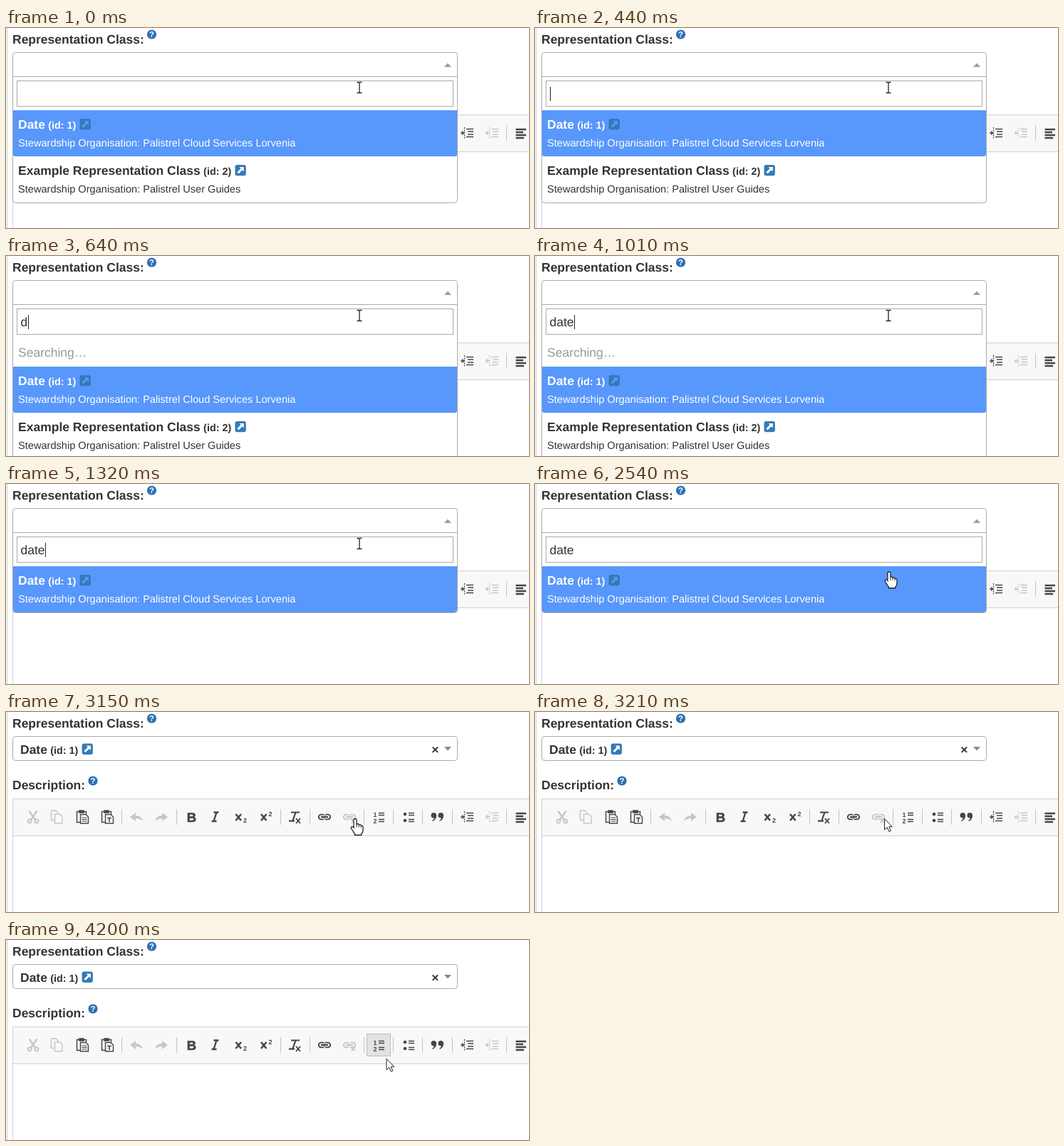
An HTML page for the animation above (4270 ms loop, 734 by 282 pixels).

```html
<!DOCTYPE html>
<html lang="en">
<head>
<meta charset="utf-8">
<title>Representation class picker</title>
<style>
  html, body { margin: 0; width: 100%; height: 100%; overflow: hidden; background: #fff; }
  svg { display: block; width: 734px; height: 282px; }
  text { font: 17.5px "Liberation Sans", Arial, sans-serif; fill: #333; text-rendering: geometricPrecision; white-space: pre; }
  .bold { font-weight: bold; }
  .small { font-size: 14.6px; }
  .id { font-size: 14.4px; font-weight: bold; }
  .on text { fill: #fff; }
  .line { fill: none; stroke: currentColor; }
  .icon { color: #454545; }
  .icon text { fill: currentColor; font-weight: bold; }
  .off { color: #c6c6c6; }
</style>
</head>
<body>
<svg id="stage" viewBox="0 0 734 282"></svg>
<script>
const LOOP = 4270;
const at = (x, y, body, attrs = '') => `<g transform="translate(${x} ${y})" ${attrs}>${body}</g>`;
const label = (x, y, text, cls = '', attrs = '') => `<text x="${x}" y="${y}" class="${cls}" ${attrs}>${text}</text>`;
const fill = (d, attrs = '') => `<path d="${d}" fill="currentColor" ${attrs}/>`;
const line = (d, width = 1, attrs = '') => `<path d="${d}" class="line" stroke-width="${width}" ${attrs}/>`;

const help = (x, y) => at(x, y,
  `<circle r="6.6" fill="#2a70b2"/><text y="4.2" text-anchor="middle" style="font-weight:bold;font-size:11.5px;fill:#fff">?</text>`);

const linkBadge = (x, y, arrow) => at(x, y,
  `<rect width="15.3" height="15.3" rx="2.8" fill="#337ab7"/>
   <path d="M6 3H12.3V9.3L10.2 7.2L5 12.4L2.9 10.3L8.1 5.1Z" fill="${arrow}"/>`);

const titled = (x, y, name, width, id, arrow) =>
  label(x, y, name, 'bold') + label(x + width + 4.3, y, `(id: ${id})`, 'id') +
  linkBadge(x + width + 48.7, y - 14, arrow);

const option = (id, name, width, number, sub, on) => `<g id="${id}" class="${on ? 'on' : ''}">
  ${on ? '<path d="M10 0H633V62Q633 65 630 65H13Q10 65 10 62Z" fill="#5897fb"/>' : ''}
  ${titled(17, 26, name, width, number, on ? '#5897fb' : '#fff')}
  ${label(17, 51, 'Stewardship Organisation: ' + sub, 'small')}</g>`;

const clipboard = line('M-2 7.5H-7.5V-7.5H5.5V-4M-4 -9H2V-6H-4Z', 1.5);
const page = line('M-2.5 -3.5H5L8.5 0V9H-2.5Z', 1.4);
const undo = fill('M-9 0L-1 -6V-2Q7 -2 9 6Q5 2 -1 2V6Z');
const chain = line('M-1 3.4H-4.8A3.4 3.4 0 0 1 -4.8 -3.4H-1M1 -3.4H4.8A3.4 3.4 0 0 1 4.8 3.4H1', 1.9) +
  line('M-5 0H5', 2.2) + line('M-1 -3.4L1 -1M-1 1L1 3.4');
const pairs = line('M0 -5.5H8M0 -2.5H8M0 3.5H8M0 6.5H8', 1.4);
const indent = line('M-3.5 -8V9', 1.3, 'stroke-dasharray="2 1.4"') +
  line('M-1 -5.5H9M1 -2H9M1 2H9M-1 5.5H9', 1.5);
const cross = line('M-7.5 -4L0 5M0 -4L-7.5 5', 2.6);
const digit = (x, y, n) => label(x, y, n, '', 'style="font-size:9px"');
const comma = fill('M-9 -2.2a3.8 3.8 0 1 1 7.6 0Q-1.4 4 -7 6.3V4.5Q-4.6 3.5 -4.6 1.6Q-9 1.6 -9 -2.2Z');

// centre x, drawing, disabled
const icons = [
  [38, line('M-5.5 -8.5L3 4M5.5 -8.5L-3 4', 2.4) + line('M-2.4 6a2.5 2.5 0 1 0 -5 0a2.5 2.5 0 1 0 5 0M7.4 6a2.5 2.5 0 1 0 -5 0a2.5 2.5 0 1 0 5 0', 1.8), 1],
  [71, line('M-3 4.5H-7.5V-9H-1L2 -6V-4M-2.5 -4H4.5L8 -1V9H-2.5Z', 1.4), 1],
  [107, clipboard + page + line('M-.5 1H6.5M-.5 3.5H6.5M-.5 6H6.5', 1.2)],
  [142, clipboard + page + line('M0 1.5H6M3 1.5V7', 1.6)],
  [183, undo, 1],
  [218, `<g transform="scale(-1 1)">${undo}</g>`, 1],
  [260, label(-6.2, 6.6, 'B', '', 'style="font-size:18.5px" stroke="currentColor" stroke-width=".6"')],
  [293.5, line('M-2 -6.5H5M-5 6H2M2 -6.5L-2 6', 2.4)],
  [330, cross + digit(3, 8, '2')],
  [365.5, cross + digit(3, -.8, '2')],
  [405, line('M-5 -6.5H7M1.5 -6.5L-2.5 5M-8 5.7H0', 2.2) + line('M2 2L8 9M8 2L2 9', 1.9)],
  [447, chain],
  [482, chain + line('M2.5 3L8 8.5M8 3L2.5 8.5', 1.7), 1],
  [523, digit(-7.5, -.5, '1') + digit(-7.5, 9, '2') + pairs],
  [565, '<circle cx="-5" cy="-4" r="2.3" fill="currentColor"/><circle cx="-5" cy="5" r="2.3" fill="currentColor"/>' + pairs],
  [605.5, comma + at(10, 0, comma)],
  [647, indent + line('M-9 0H-5M-7 -2.5L-4.5 0L-7 2.5', 1.4)],
  [682, indent + line('M-4 0H-8M-6 -2.5L-8.5 0L-6 2.5', 1.4), 1],
  [722, line('M-6.5 -5H8M-6.5 -1H4M-6.5 3H8M-6.5 7H5', 2.7)]
];
const separators = [162, 239, 385, 426, 502, 543, 584, 626, 702];

const cursors = {
  beam: line('M-3.5 -7.5H-1Q0 -7.5 0 -6.5Q0 -7.5 1 -7.5H3.5M0 -7V7M-3.5 7.5H-1Q0 7.5 0 6.5Q0 7.5 1 7.5H3.5', 1.3),
  arrow: '<path d="M.5 .5V16L4.2 12.6L6.8 18.5L9.3 17.4L6.8 11.7H11.3Z" fill="#fff" stroke="#222"/>',
  hand: `<path d="M-2 2Q-2 .5 0 .5T2 2V8Q4.8 6.8 5.2 9Q8 8 8.3 10.2Q11 9.5 11 12V17Q11 20 8.7 22V23.5H-.5V22L-5 15Q-6.5 12.5 -4.8 11.8Q-3.3 11.2 -2 13Z" fill="#fff" stroke="#222" stroke-width="1.3"/>
    ${line('M2 8V12.5M5.2 9V12.5M8.3 10.2V13')}`
};

document.getElementById('stage').innerHTML = `
  <rect width="734" height="282" fill="#fff"/>
  <path d="M1.5 0V282" stroke="#d0d0d0"/>
  ${label(9, 21.5, 'Representation Class:', 'bold')}${help(204.5, 9)}
  ${label(9, 108.5, 'Description:', 'bold')}${help(122, 97)}
  <rect x="9.5" y="122.5" width="740" height="52" fill="#f8f8f8"/>
  <path d="M734 122.5H9.5V175M10 174.5H734" fill="none" stroke="#d1d1d1"/>
  <path d="M9.5 175V282" stroke="#d2ccec"/>
  <rect id="hover" x="506.5" y="132.5" width="33" height="31" fill="#e3e3e3" stroke="#bcbcbc"/>
  ${separators.map(x => `<path d="M${x}.5 137V159" stroke="#c4c4c4"/>`).join('')}
  ${icons.map(([x, body, off]) => at(x, 148, body, `class="icon ${off ? 'off' : ''}"`)).join('')}
  <g id="closed">
    <rect x="9.5" y="34.5" width="624" height="34" rx="4" fill="#fff" stroke="#aaa"/>
    ${titled(20, 58.6, 'Date', 37.9, 1, '#fff')}
    ${label(597.3, 58.5, '×', 'bold')}
    <path d="M615 49H625L620 54.5Z" fill="#888"/>
  </g>
  <g id="open">
    <path d="M9.5 68.5V38.5Q9.5 34.5 13.5 34.5H629.5Q633.5 34.5 633.5 38.5V68.5Z" fill="#fff" stroke="#aaa"/>
    <path d="M615 55H625L620 49.5Z" fill="#b8957f"/>
    <path class="panel" fill="#fff"/>
    <rect x="15.5" y="74.5" width="612" height="36" fill="#fff" stroke="#aaa"/>
    ${label(20.5, 99, '', '', 'id="typed"')}
    <path id="caret" d="M0 83V103" stroke="#222"/>
    ${label(17, 142, 'Searching…', '', 'id="searching" style="fill:#999"')}
    ${option('first', 'Date', 37.9, 1, 'Palistrel Cloud Services Lorvenia', true)}
    ${option('second', 'Example Representation Class', 255.8, 2, 'Palistrel User Guides', false)}
    <path class="panel" fill="none" stroke="#aaa"/>
  </g>
  <circle id="click" r="15" fill="#ff0" fill-opacity=".47"/>
  <g id="pointer" color="#222">${Object.keys(cursors).map(k => `<g id="${k}">${cursors[k]}</g>`).join('')}</g>`;

const el = id => document.getElementById(id);
const show = (id, on) => el(id).setAttribute('display', on ? 'inline' : 'none');
const move = (id, x, y) => el(id).setAttribute('transform', `translate(${x} ${y})`);
const within = (t, from, to) => t >= from && t < to;

// time, x, y of the pointer; it glides from one point to the next
const pointerPath = [
  [0, 496, 84], [1900, 496, 84], [2410, 497, 118], [2530, 497, 118], [2540, 497, 123],
  [2650, 490, 150], [4100, 490, 150], [4200, 533.5, 167], [LOOP, 533.5, 167]
];
const keyTimes = [640, 730, 810, 890];

function pointerAt(t) {
  const next = pointerPath.findIndex(([time]) => time > t);
  const [t0, x0, y0] = pointerPath[next - 1], [t1, x1, y1] = pointerPath[next];
  const k = (t - t0) / (t1 - t0);
  return [x0 + (x1 - x0) * k, y0 + (y1 - y0) * k];
}

function draw(t) {
  const open = t < 3150, searching = within(t, 640, 1320), filtered = t >= 1320;
  show('open', open);
  show('closed', !open);

  el('typed').textContent = 'date'.slice(0, keyTimes.filter(k => t >= k).length);
  show('caret', within(t, 340, 1390) || within(t, 1890, 2410));
  move('caret', 21.5 + Math.round(el('typed').getComputedTextLength()), 0);

  const top = searching ? 156 : 116, bottom = top + (filtered ? 65.5 : 130.5);
  show('searching', searching);
  show('second', !filtered);
  move('first', 0, top);
  move('second', 0, top + 65);
  for (const panel of document.querySelectorAll('.panel'))
    panel.setAttribute('d', `M9.5 68.5H633.5V${bottom - 4}q0 4 -4 4H13.5q-4 0 -4 -4Z`);

  const [x, y] = pointerAt(t);
  const shape = y < 111 ? 'beam' : y < 116 || t >= 3210 ? 'arrow' : 'hand';
  for (const name in cursors) show(name, name === shape);
  move('pointer', x, y);
  const firstClick = within(t, 250, 440);
  show('click', firstClick || within(t, 2970, 3150));
  move('click', ...(firstClick ? [494, 83] : [490, 150]));
  show('hover', t >= 4150);
}

const start = performance.now();
function tick() {
  draw((performance.now() - start) % LOOP);
  requestAnimationFrame(tick);
}
tick();
</script>
</body>
</html>
```
